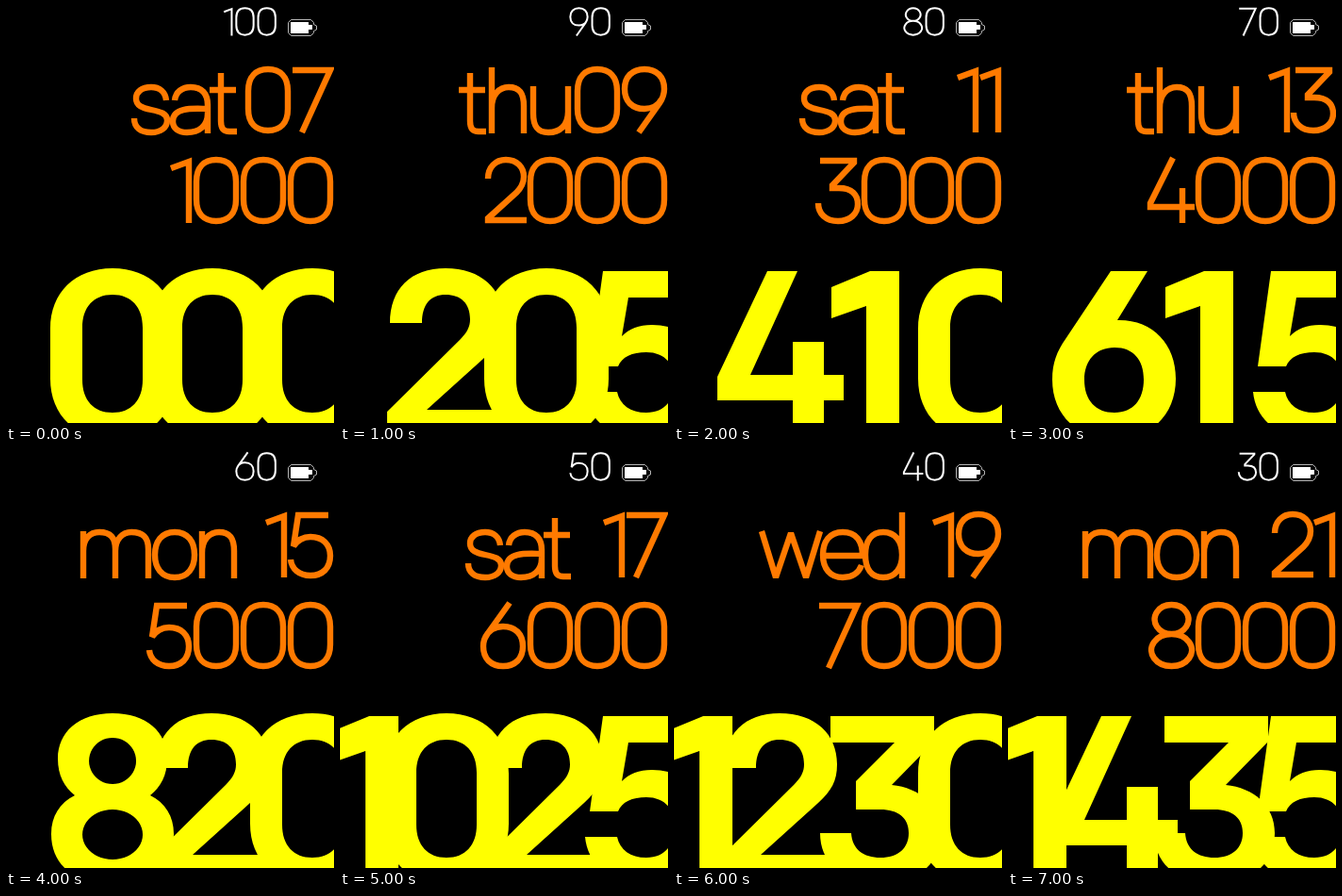
These frames come from a looping animation (348 px wide and 442 px high, 8000 ms). An HTML page:

```html
<!DOCTYPE html>
<html lang="en">
<head>
<meta charset="utf-8">
<title>Watch face</title>
<style>
  html, body { margin: 0; width: 100%; height: 100%; overflow: hidden; background: #000; }
  svg { display: block; }
  .line { fill: none; stroke-miterlimit: 2.4; }
</style>
</head>
<body>
<svg id="face" role="img" width="348" height="442" viewBox="0 0 348 442">
  <g id="level" class="line" stroke="#fff" stroke-width="4.6"></g>
  <path fill="none" stroke="#b4b4b4" d="M302.5 14.5H323.5L326.5 17.5V19.5L329.5 21V25L326.5 26.5V28.5L323.5 31.5H302.5L299.5 28.5V17.5Z"/>
  <path fill="#fff" d="M302 17H321V20H325V25H321V29H302Z"/>
  <g id="date" class="line" stroke="#ff7a00" stroke-width="6.4"></g>
  <g id="clock" fill="#ff0"></g>
</svg>
<script>
// Thin lettering: centre lines in a 71 px high box
const THIN = {
  0: 'M25 3C38 3 46 11 46 26V45C46 60 38 68 25 68C12 68 4 60 4 45V26C4 11 12 3 25 3Z',
  1: 'M1 12L20 5V70',
  2: 'M4 23C4 11 12 3 23 3C35 3 42 11 42 21C42 28 39 33 34 38L4 65V67H45',
  3: 'M5 4H41V6L18 30V33H25C39 33 45 40 45 50C45 60 37 68 24 68C11 68 3 60 3 49',
  4: 'M27 1L3 49V53H50M37 33V70',
  5: 'M43 4H11L6 37C10 31 16 27 24 27C37 27 45 35 45 47C45 60 37 68 24 68C12 68 4 61 3 51',
  6: 'M31 1L8 33C4 38 3 42 3 47C3 60 11 68 24 68C37 68 45 60 45 47C45 34 37 26 24 26C15 26 8 31 5 38',
  7: 'M1 4H41L11 70',
  8: 'M24.5 3a18 15.5 0 1 0 .1 0ZM24.5 34a21.5 17 0 1 0 .1 0Z',
  9: 'M19 70L41 39C45 33 46 29 46 24C46 11 38 3 25 3C12 3 4 11 4 24C4 37 12 45 25 45C33 45 40 41 43 35',
  s: 'M37 36C36 27 30 22 21 22C11 22 5 27 5 34C5 42 12 44 21 46C31 48 38 50 38 57C38 65 31 70 21 70C10 70 3 65 3 55',
  a: 'M5 36C6 27 13 22 22 22C34 22 40 29 40 41V71M40 45C28 45 3 42 3 58C3 66 9 70 18 70C31 70 40 63 40 50',
  t: 'M0 25H28M12 7V58C12 66 15 69 21 69H29',
  h: 'M4 1V71M4 44C4 30 12 22 22 22C34 22 38 29 38 42V71',
  u: 'M4 21V50C4 64 9 70 20 70C32 70 41 63 41 48M41 21V71',
  m: 'M4 21V71M4 42C4 29 11 22 21 22C33 22 38 28 38 40V71M38 42C38 29 46 22 55 22C68 22 73 28 73 40V71',
  o: 'M24 22C38 22 45 32 45 46C45 60 38 70 24 70C10 70 3 60 3 46C3 32 10 22 24 22Z',
  n: 'M4 21V71M4 44C4 30 12 22 22 22C34 22 38 29 38 42V71',
  w: 'M3 21L18 70L34 23L50 70L65 21',
  e: 'M3 47H45C45 31 38 22 24 22C10 22 3 32 3 46C3 61 11 70 24 70C34 70 41 65 44 57',
  d: 'M42 1V71M22 22C35 22 42 32 42 46C42 60 35 70 22 70C9 70 3 60 3 46C3 32 9 22 22 22Z'
};
const ADVANCE = [50, 24, 45, 48, 50, 49, 49, 45, 49, 50];
const DAYS = {
  sat: [133, 174, 216],
  mon: [78, 155, 204],
  wed: [90, 155, 200],
  thu: [126, 157, 201]
};

// Bold digits: outlines in a 132 x 181 box
const BOLD = {
  0: 'M66 0C106 0 132 26 132 64V117C132 155 106 181 66 181C26 181 0 155 0 117V64C0 26 26 0 66 0ZM66 28C46 28 34 41 34 63V118C34 140 46 153 66 153C86 153 98 140 98 118V63C98 41 86 28 66 28Z',
  1: 'M55 3H86V181H51V40L14 53V20Z',
  2: 'M6 58C6 22 28 0 65 0C103 0 126 22 126 54C126 72 120 82 106 95L45 150H126V181H3V152L80 76C88 68 91 62 91 54C91 37 81 28 65 28C49 28 40 38 40 58Z',
  3: 'M13 3H123V30L78 76C108 79 130 98 130 127C130 160 104 181 67 181C28 181 2 160 2 127H35C36 144 48 153 66 153C85 153 96 143 96 127C96 111 85 102 66 102H40V72L81 31H13Z',
  4: 'M52 3H84L34 113H79V78H112V113H133V140H112V181H79V140H-1V115Z',
  5: 'M20 3H118V31H47L40 72C48 64 58 60 72 60C108 60 131 85 131 119C131 158 104 181 66 181C30 181 4 162 1 131H35C38 145 49 153 66 153C85 153 96 140 96 120C96 101 85 89 66 89C51 89 40 94 36 104H6Z',
  6: 'M62 3H101L69 55C106 54 131 80 131 117C131 156 104 181 66 181C27 181 0 156 0 118C0 100 5 88 14 75ZM66 84C46 84 34 98 34 118C34 140 46 153 66 153C86 153 97 139 97 118C97 97 86 84 66 84Z',
  8: 'M66 0C102 0 124 20 124 48C124 66 117 78 106 87C122 95 131 109 131 128C131 161 106 181 66 181C26 181 1 161 1 128C1 109 10 95 26 87C15 78 8 66 8 48C8 20 30 0 66 0ZM66 26a25 24.5 0 1 0 .1 0ZM66 102a32 26.5 0 1 0 .1 0Z'
};

const $ = id => document.getElementById(id);
const glyph = (d, x, y, scale = 1) =>
  `<path d="${d}" transform="translate(${x} ${y}) scale(${scale})"/>`;

function digits(text, right, y, scale = 1, gap = 0) {
  let out = '', x = right;
  for (const c of [...text].reverse()) {
    x -= ADVANCE[c] * scale + gap;
    out += glyph(THIN[c], x, y, scale);
  }
  return out;
}

function show(step) {
  const date = new Date(2017, step, 7 + 2 * step);
  const day = ['sun', 'mon', 'tue', 'wed', 'thu', 'fri', 'sat'][date.getDay()];
  const num = String(date.getDate()).padStart(2, '0');
  const year = String(1000 * (step + 1));
  const level = String(100 - 10 * step);
  const mins = 125 * step;
  const time = Math.floor(mins / 60) + String(mins % 60).padStart(2, '0');

  $('level').innerHTML = digits(level, 289, 1, .436, 1.4);
  $('date').innerHTML =
    [...day].map((c, i) => glyph(THIN[c], DAYS[day][i], 64)).join('') +
    digits(num, 348, 64) + digits(year, 348, 160);
  $('clock').innerHTML = [...time].map((c, i) => {
    const slot = 3 - time.length + i;
    return glyph(BOLD[c], slot < 0 ? -24 : 47 + 106 * slot, 278);
  }).join('');
  $('face').setAttribute('aria-label', `${level}% ${day} ${num} ${year} ${time}`);
}

let shown = -1;
const start = performance.now();
function tick() {
  const step = Math.floor((performance.now() - start) / 1000) % 8;
  if (step !== shown) show(shown = step);
  requestAnimationFrame(tick);
}
tick();
</script>
</body>
</html>
```
